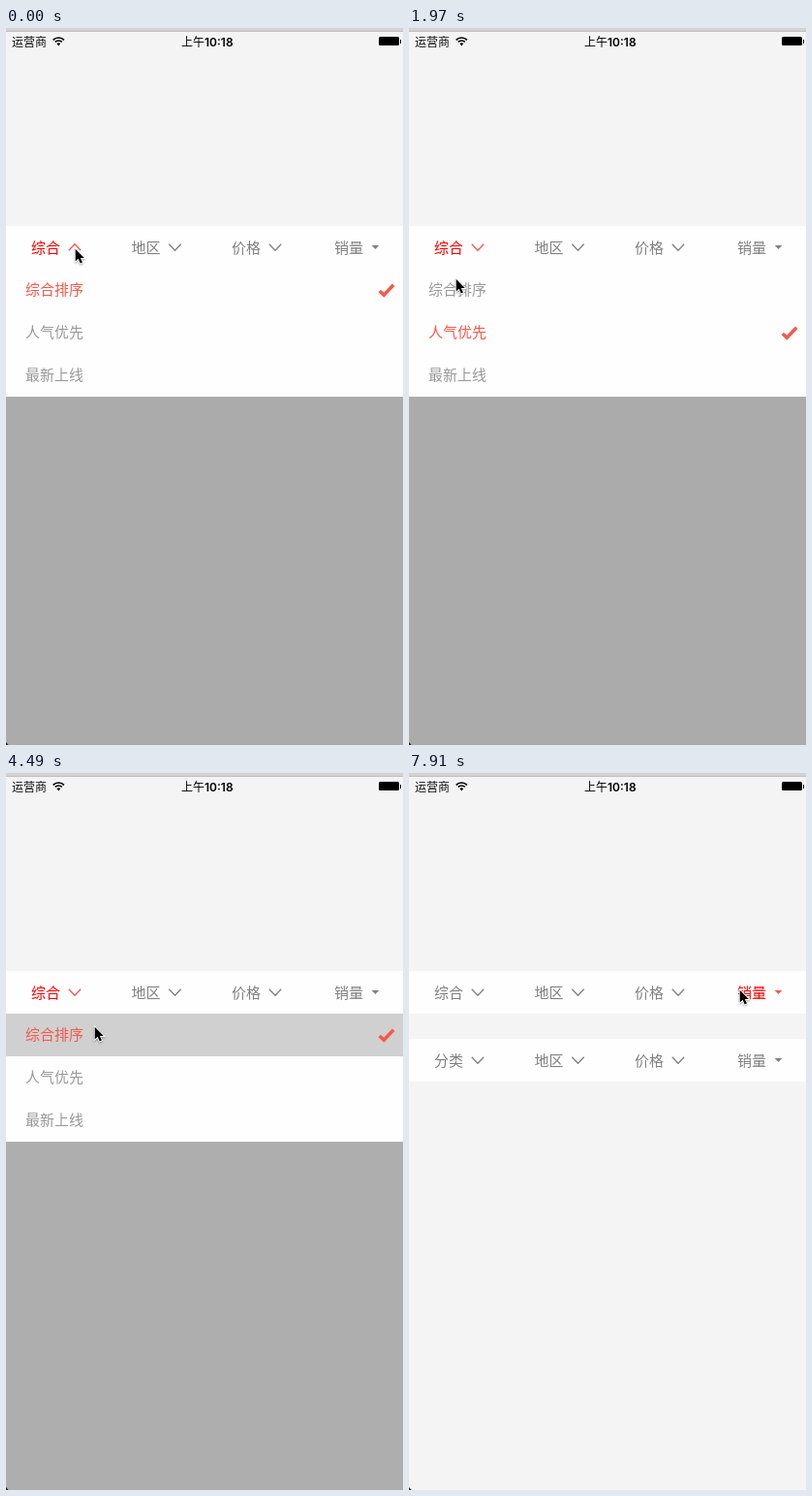
These frames come from a looping animation (410x739 px, 8000 ms). An HTML page with a canvas:

```html
<!DOCTYPE html>
<html lang="zh-CN">
<head>
<meta charset="utf-8">
<title>筛选菜单</title>
<style>
  html, body { margin: 0; width: 100%; height: 100%; overflow: hidden; background: #f4f4f4; }
  canvas { display: block; width: 410px; height: 739px; }
</style>
</head>
<body>
<canvas id="stage"></canvas>
<script>
const W = 410, H = 739, LOOP = 8000;
const canvas = document.getElementById('stage');
const ratio = window.devicePixelRatio || 1;
canvas.width = W * ratio;
canvas.height = H * ratio;
const ctx = canvas.getContext('2d');
ctx.scale(ratio, ratio);

const CJK = '"Noto Sans CJK SC", "Noto Sans CJK", sans-serif';
const GREY = '#808080', RED = '#ff0000', CORAL = '#f4594a';
const BAR_H = 44, MENU_Y = 248, ROW_H = 44;
const ROWS = ['综合排序', '人气优先', '最新上线'];
const TABS = [
  { x: 26, icon: 71 }, { x: 129.5, icon: 174.5 },
  { x: 233, icon: 278 }, { x: 339, icon: 381.5 }
];

// Each step holds until the next and overrides only what changes.
const STEPS = [
  { t: 0, at: [71, 227], open: 1, dim: 1, picked: 0, pressed: -1, tab: 0, up: true },
  { t: 240, at: [62, 293] },
  { t: 620, picked: 1, pressed: 1, dim: 0.957 },
  { t: 770, open: 0.5, dim: 0.5 },
  { t: 920, open: 0, dim: 0, pressed: -1 },
  { t: 1070, at: [62, 270] },
  { t: 1220, at: [60, 240] },
  { t: 1370, at: [60, 228] },
  { t: 1520, up: false },
  { t: 1670, dim: 0.03 },
  { t: 1820, open: 0.5, dim: 0.5 },
  { t: 1970, open: 1, dim: 1, at: [48, 258] },
  { t: 2510, at: [73, 353] },
  { t: 2810, picked: 2, pressed: 2, dim: 0.957 },
  { t: 2960, open: 0.5, dim: 0.5 },
  { t: 3100, open: 0, dim: 0, pressed: -1 },
  { t: 3400, at: [62, 228] },
  { t: 3550, up: true },
  { t: 3700, open: 0.5, dim: 0.5 },
  { t: 3850, open: 1, dim: 1, up: false },
  { t: 3990, at: [80, 250] },
  { t: 4350, at: [91, 261] },
  { t: 4490, picked: 0, pressed: 0, dim: 0.957 },
  { t: 4640, open: 0.5, dim: 0.5, at: [118, 245] },
  { t: 4790, open: 0, dim: 0, pressed: -1, at: [164, 223] },
  { t: 4940, tab: 1, up: true },
  { t: 5090, at: [161, 223] },
  { t: 5680, at: [222, 221] },
  { t: 5820, at: [281, 223] },
  { t: 6270, tab: 2 },
  { t: 6570, at: [318, 224] },
  { t: 6720, at: [372, 224] },
  { t: 6870, at: [350, 224] },
  { t: 7020, at: [341, 223] },
  { t: 7320, tab: 3 },
  { t: 7610, up: false },
  { t: 7760, up: true },
  { t: 7910, up: false }
];

const stateAt = t => Object.assign({}, ...STEPS.filter(s => s.t <= t));

function rect(x, y, w, h, color) {
  ctx.fillStyle = color;
  ctx.fillRect(x, y, w, h);
}

function label(text, x, midY, color, font = `15px ${CJK}`) {
  ctx.font = font;
  ctx.fillStyle = color;
  ctx.fillText(text, x, midY + parseFloat(font.match(/\d+(?=px)/)) * 0.38);
}

function path(points, close) {
  ctx.beginPath();
  points.forEach(([x, y]) => ctx.lineTo(x, y));
  if (close) ctx.closePath();
}

function statusBar() {
  rect(0, 0, W, 3, '#d2d2d2');
  rect(0, 3, W, 1, '#c0c0c0');
  label('运营商', 6, 14.5, '#111', `12px ${CJK}`);
  label('上午', 181, 14.5, '#000', `12px ${CJK}`);
  label('10:18', 205, 14.5, '#000', '600 12px Inter, sans-serif');

  ctx.strokeStyle = ctx.fillStyle = '#000';
  ctx.lineWidth = 1.7;
  for (const r of [5, 8]) {
    ctx.beginPath();
    ctx.arc(54.3, 18, r, -Math.PI * 0.75, -Math.PI * 0.25);
    ctx.stroke();
  }
  ctx.beginPath();
  ctx.moveTo(54.3, 18.5);
  ctx.arc(54.3, 18, 2.7, -Math.PI * 0.75, -Math.PI * 0.25);
  ctx.fill();

  ctx.beginPath();
  ctx.roundRect(385, 9, 21, 9, 1.5);
  ctx.fill();
  rect(407, 12, 1, 4, '#000');
}

function chevron(x, y, up, color) {
  const d = up ? -3.3 : 3.3;
  path([[x - 6.2, y - d], [x, y + d], [x + 6.2, y - d]]);
  ctx.strokeStyle = color;
  ctx.lineWidth = 1.3;
  ctx.stroke();
}

function triangle(x, y, up, color) {
  const d = up ? -2 : 2;
  path([[x - 3.8, y - d], [x + 3.8, y - d], [x, y + d]], true);
  ctx.fillStyle = color;
  ctx.fill();
}

function filterBar(top, first, active, up) {
  const mid = top + BAR_H / 2;
  rect(0, top, W, BAR_H, '#fefefe');
  [first, '地区', '价格', '销量'].forEach((name, i) => {
    const on = i === active;
    const icon = i === 3 ? triangle : chevron;
    label(name, TABS[i].x, mid, on ? RED : GREY);
    icon(TABS[i].icon, mid, on && up, on ? CORAL : GREY);
  });
}

function checkMark(y) {
  path([[385.8, y + 1], [390.3, y + 5.3], [400.2, y - 5.3]]);
  ctx.strokeStyle = CORAL;
  ctx.lineWidth = 3.5;
  ctx.stroke();
}

function menu({ open, dim, picked, pressed }) {
  rect(0, MENU_Y, W, H - MENU_Y, `rgba(0,0,0,${0.3 * dim})`);
  if (!open) return;
  ctx.save();
  ctx.beginPath();
  ctx.rect(0, MENU_Y, W, ROWS.length * ROW_H * open);
  ctx.clip();
  ROWS.forEach((name, i) => {
    const y = MENU_Y + i * ROW_H;
    rect(0, y, W, ROW_H, i === pressed ? '#d0d0d0' : '#fefefe');
    label(name, 20, y + 21.5, i === picked ? CORAL : '#999');
    if (i === picked) checkMark(y + 22);
  });
  ctx.restore();
}

function pointer([x, y]) {
  ctx.save();
  ctx.translate(x + 0.7, y + 0.7);
  ctx.scale(0.86, 0.86);
  path([[0, 0], [0, 15], [3.4, 11.8], [5.8, 17.2], [8.4, 16], [6, 10.9], [10.6, 10.9]], true);
  ctx.shadowColor = 'rgba(0,0,0,0.35)';
  ctx.shadowBlur = 2 * ratio;
  ctx.shadowOffsetY = ratio;
  ctx.strokeStyle = '#fff';
  ctx.lineWidth = 2;
  ctx.stroke();
  ctx.shadowColor = 'transparent';
  ctx.fillStyle = '#000';
  ctx.fill();
  ctx.restore();
}

function draw(t) {
  const state = stateAt(t);
  rect(0, 0, W, H, '#f4f4f4');
  statusBar();
  filterBar(204, '综合', state.tab, state.up);
  filterBar(274, '分类', -1, false);
  menu(state);
  path([[0, 736], [2.5, H], [0, H]], true);
  ctx.fillStyle = '#222';
  ctx.fill();
  pointer(state.at);
}

const start = performance.now();
function tick() {
  draw((performance.now() - start) % LOOP);
  requestAnimationFrame(tick);
}
tick();
</script>
</body>
</html>
```
